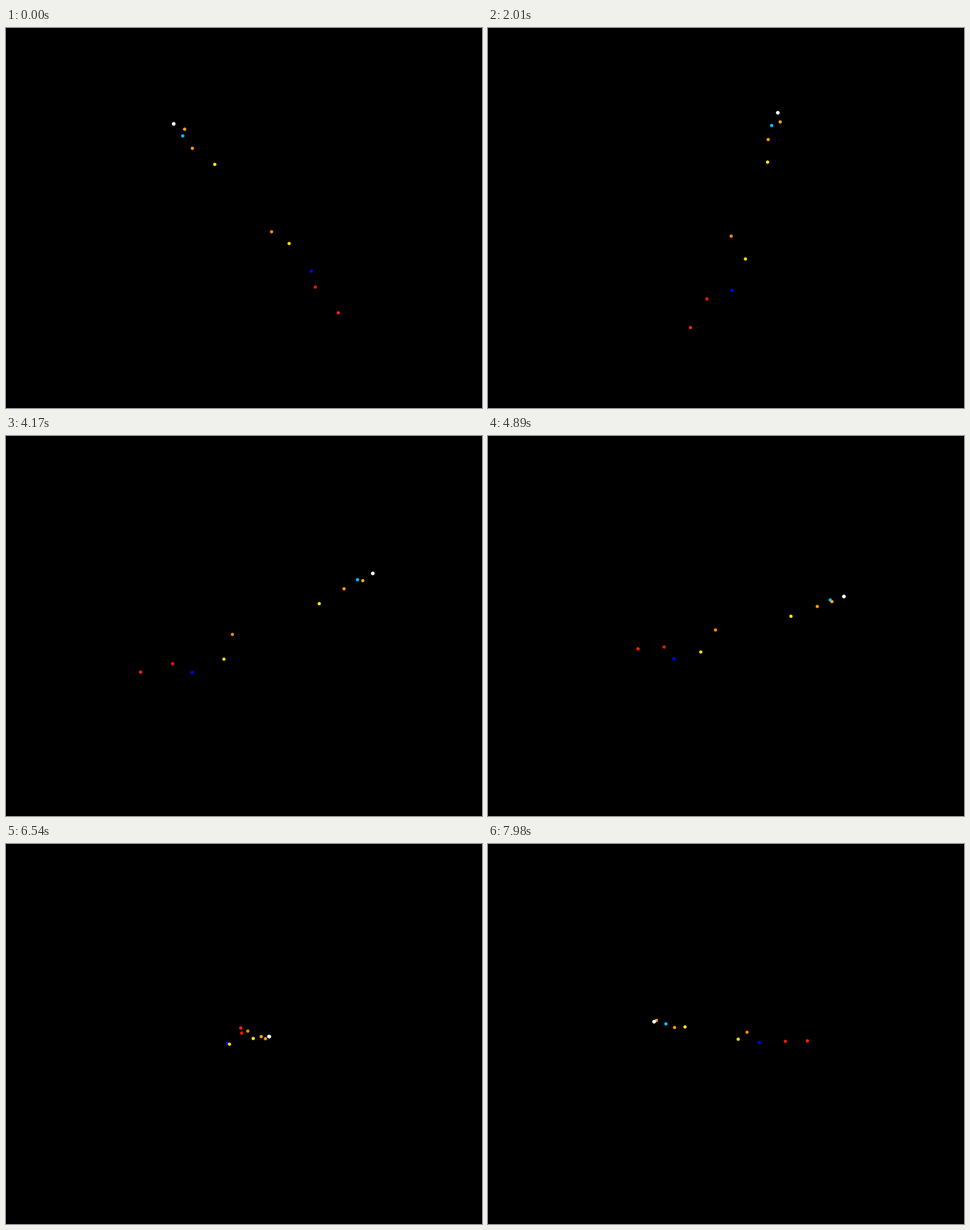
Recreate the animation shown at these times as a matplotlib script. Size 837 px wide and 669 px high, loop 8 s.

```python
import numpy as np
import matplotlib.pyplot as plt
from matplotlib.animation import FuncAnimation

W, H, DPI = 837, 669, 96
LOOP_MS, TICK_MS, STEP_MS = 8000, 20, 30

# Stars in pixel units around the turning axis: x, y, z, colour, diameter
STARS = [
    (-144.6, -144.6, 108.5, "#ffffff", 6.5),
    (-140.6, -125.0, 99.7, "#ffa500", 5.8),
    (-125.0, -127.9, 94.1, "#00bfff", 5.8),
    (-110.4, -110.4, 76.6, "#ff9800", 5.8),
    (-91.6, -70.1, 53.9, "#ffe812", 5.8),
    (22.1, 31.0, -19.3, "#ff8400", 5.8),
    (8.5, 62.4, -51.5, "#ffd700", 5.8),
    (50.4, 101.0, -82.9, "#0000ff", 5.8),
    (99.0, 106.3, -85.2, "#ff1400", 5.8),
    (144.6, 144.6, -108.5, "#ff2400", 5.8),
]
xyz = np.array([s[:3] for s in STARS])
colors = np.array([s[3] for s in STARS])
sizes = np.array([(s[4] * 72 / DPI) ** 2 for s in STARS])

CENTER = np.array([435.92, 330.88])
CAMERA = 2784.5
ELEV = np.radians(30)


def project(azim):
    """Return screen positions and depths for a view from azim degrees."""
    a = np.radians(azim)
    x, y, z = xyz.T
    right = y * np.cos(a) - x * np.sin(a)
    away = -x * np.cos(a) - y * np.sin(a)
    depth = away * np.cos(ELEV) - z * np.sin(ELEV)
    up = away * np.sin(ELEV) + z * np.cos(ELEV)
    zoom = CAMERA / (CAMERA + depth)
    return CENTER + np.column_stack([right * zoom, -up * zoom]), depth


fig = plt.figure(figsize=(W / DPI, H / DPI), dpi=DPI, facecolor="black")
ax = fig.add_axes([0, 0, 1, 1])
ax.set_xlim(0, W)
ax.set_ylim(H, 0)
ax.axis("off")
dots = ax.scatter(np.zeros(len(STARS)), np.zeros(len(STARS)),
                  s=sizes, c=colors, linewidths=0)


def update(i):
    # One degree per step
    azim = (i * TICK_MS + TICK_MS // 2) // STEP_MS
    pos, depth = project(azim)
    order = np.argsort(-depth)
    dots.set_offsets(pos[order])
    dots.set_facecolors(colors[order])
    dots.set_sizes(sizes[order], DPI)
    return [dots]


anim = FuncAnimation(fig, update, frames=LOOP_MS // TICK_MS, interval=TICK_MS,
                     init_func=lambda: update(0), repeat=True, repeat_delay=0)
plt.show()
```
